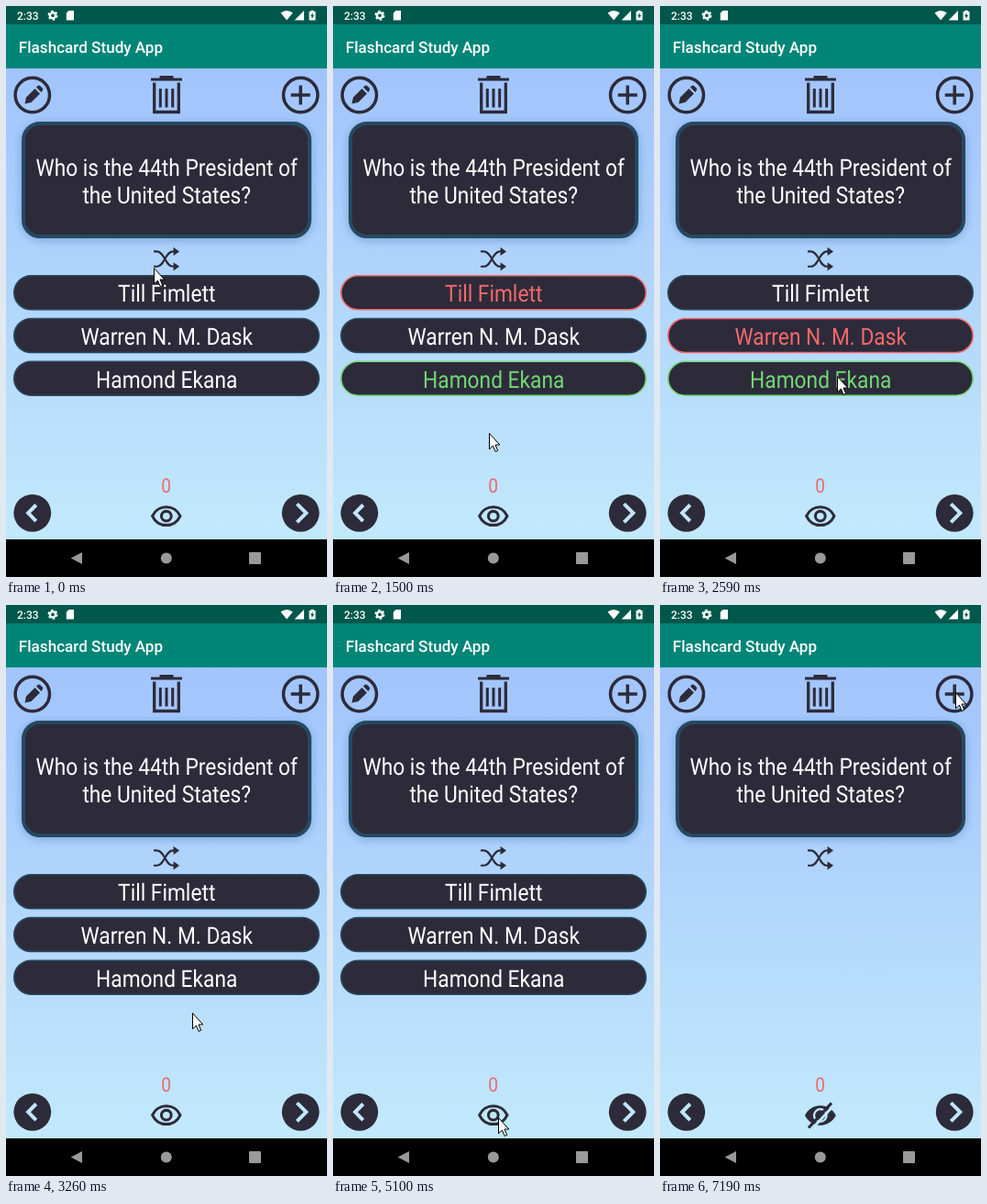
Animation of 350 by 622 pixels, one loop 8 s. Source, as an HTML page:

```html
<!DOCTYPE html>
<html lang="en">
<head>
<meta charset="utf-8">
<title>Flashcard Study App</title>
<style>
html, body { margin: 0; width: 100%; height: 100%; overflow: hidden; background: #000; }
svg { display: block; width: 350px; height: 622px; }
text { font-family: Roboto, sans-serif; fill: #fff; text-rendering: geometricPrecision; }
.bar { font-weight: 500; }
.big { font-size: 25.6px; text-anchor: middle; }
.ink { fill: #2d2b3a; }
.line { fill: none; stroke: #2d2b3a; }
.answer rect { fill: #2d2b3a; stroke: #29475f; stroke-width: 1.6; }
.wrong rect { stroke: #f4696b; }
.right rect { stroke: #72d873; }
.wrong text { fill: #f4696b; }
.right text { fill: #72d873; }
.hidden { display: none; }
</style>
</head>
<body>
<svg viewBox="0 0 350 622">
  <defs>
    <linearGradient id="sky" x2="0" y2="1">
      <stop stop-color="#a1c4fd"/><stop offset="1" stop-color="#c2e9fb"/>
    </linearGradient>
    <filter id="soft" x="-10%" y="-20%" width="120%" height="140%"><feGaussianBlur stdDeviation="4"/></filter>
  </defs>

  <rect y="68" width="350" height="513" fill="url(#sky)"/>
  <rect width="350" height="20" fill="#00574b"/>
  <rect y="20" width="350" height="48" fill="#008577"/>
  <rect y="581" width="350" height="41"/>

  <!-- status bar -->
  <text class="bar" x="12" y="14.7" font-size="12">2:33</text>
  <g fill="#fff">
    <circle cx="51" cy="10.3" r="3.1" fill="none" stroke="#fff" stroke-width="2.4"/>
    <circle cx="51" cy="10.3" r="4.7" fill="none" stroke="#fff" stroke-width="1.6" stroke-dasharray="2.5 2.42"/>
    <path d="M68.5 5H74V15.5H65.8V7.7Z"/>
    <path d="M299.5 7.6Q306 2.6 312.8 7.6L306.1 15.4Z"/>
    <path d="M325 5V15.4H314.6Z"/>
    <path d="M332.4 4.8H335.6V6H337.5V15.5H330.5V6H332.4Z"/>
  </g>
  <path d="M334.6 7.2L331.9 11.3H333.5V14L336.1 9.9H334.6Z" fill="#00574b"/>
  <text class="bar" x="13.8" y="51" font-size="17.1">Flashcard Study App</text>

  <!-- tools -->
  <g class="line" stroke-width="3.5">
    <circle cx="28.8" cy="97" r="18.7"/>
    <circle cx="321.2" cy="97" r="18.7"/>
    <path d="M321.2 86.5V107.5M310.7 97H331.7"/>
    <path d="M158 80H192M167.5 77.6H182.5" stroke-width="3"/>
    <path d="M161.7 83.5V115.5H188.3V83.5" stroke-width="3.3"/>
    <path d="M168.3 90V110.5M175 90V110.5M181.7 90V110.5" stroke-width="3"/>
  </g>
  <path class="ink" d="M22 99.5L31.5 90L37 95.5L27.5 105L20.5 106.5ZM33 88.5L34.8 86.8Q36 86 37.2 86.9L39.8 89.6Q40.8 90.8 39.8 92.1L38.4 93.9Z"/>

  <!-- card -->
  <rect x="15" y="126" width="320" height="131" rx="24" fill="#6797cf" opacity=".55" filter="url(#soft)"/>
  <rect class="ink" x="19" y="128" width="312" height="123" rx="18" stroke="#264860" stroke-width="4"/>
  <g id="question"></g>

  <!-- shuffle -->
  <path class="line" stroke-width="2.1" d="M161 267.4H164.5C173 267.4 173.5 283.8 182 283.8H184M161 283.8H164.5C173 283.8 173.5 267.4 182 267.4H184"/>
  <path class="ink" d="M182.6 262.8L189 267.4L182.6 272ZM182.6 279.2L189 283.8L182.6 288.4Z"/>

  <g id="answers"></g>

  <!-- bottom row -->
  <text transform="translate(174.6 530) scale(.888 1)" font-size="21.5" text-anchor="middle" style="fill:#ee686f">0</text>
  <g id="open" class="line" stroke-width="2" transform="translate(174.8 555.7) scale(1.53)">
    <path d="M-9.9 0C-6.2 -8.6 6.2 -8.6 9.9 0C6.2 8.6 -6.2 8.6 -9.9 0Z"/>
    <circle r="3.5"/>
  </g>
  <g id="shut">
    <path class="ink" d="M158 556C165 541.6 184.5 541.6 191.8 556C184.5 570.4 165 570.4 158 556Z"/>
    <circle cx="174.8" cy="556" r="6.8" fill="none" stroke="#c0e7fb" stroke-width="2.3"/>
    <path d="M190 544.5L165 571.5" stroke="#c0e7fb" stroke-width="3"/>
    <path class="line" d="M187 542.5L162 569.5" stroke-width="3.2"/>
  </g>
  <circle class="ink" cx="28.8" cy="552.3" r="20.4"/>
  <circle class="ink" cx="321.2" cy="552.3" r="20.4"/>
  <path d="M32.8 543.5L24.2 552.3L32.8 561.1M317.3 542.3L327.3 552.3L317.3 562.3" fill="none" stroke="#c0e6fb" stroke-width="4"/>

  <!-- navigation bar -->
  <g fill="#999">
    <path d="M83 595V608L70.7 601.5Z"/>
    <circle cx="174.8" cy="601.5" r="6"/>
    <rect x="265" y="595" width="13" height="13" rx=".8"/>
  </g>

  <path id="cursor" d="M.5 .6V17.8L4.4 14.1L7.1 20.4L9.7 19.3L7 13H11.8Z" fill="#fff" stroke="#000" stroke-linejoin="round"/>
</svg>
<script>
const LOOP = 8000;
const STEP = 120;       // the pointer moves in visible jumps
const FEEDBACK = 760;   // how long a picked answer stays coloured
const HIDE = 5630;
const RIGHT = 2;
const picks = [1070, 2470, 4090];  // when each answer is pressed, top to bottom

// where the pointer heads next, and when it sets off
const home = { x: 161, y: 285 };
const goals = [
  { at: 0, x: 189, y: 452 },
  { at: 400, x: 181, y: 320 },
  { at: picks[0], x: 170, y: 465 },
  { at: 1920, x: 182, y: 362 },
  { at: picks[1], x: 203, y: 444 },
  { at: 3260, x: 194, y: 412 },
  { at: picks[2], x: 194, y: 454 },
  { at: 4860, x: 180, y: 558 },
  { at: 6380, x: 322, y: 95 }
];

const $ = id => document.getElementById(id);
const smooth = u => u * u * (3 - 2 * u);

// Roboto narrowed to the proportions of its condensed cut
const label = (str, y) =>
  `<text class="big" transform="translate(175.2 ${y}) scale(.888 1)">${str}</text>`;

$('question').innerHTML =
  label('Who is the 44th President of', 185.2) + label('the United States?', 215.2);

$('answers').innerHTML = ['Till Fimlett', 'Warren N. M. Dask', 'Hamond Ekana']
  .map((name, i) => {
    const y = 293.8 + i * 46.7;
    return `<g class="answer"><rect x="8.8" y="${y}" width="332.4" height="37" rx="18.5"/>${label(name, y + 28.3)}</g>`;
  }).join('');

const answers = [...$('answers').children];

function pointer(t) {
  const i = goals.findLastIndex(g => g.at <= t);
  const to = goals[i], from = goals[i - 1] || home;
  const dx = to.x - from.x, dy = to.y - from.y;
  const jumps = Math.round(1.3 + Math.hypot(dx, dy) / 100);
  const u = smooth(Math.min(1, Math.floor((t - to.at) / STEP) / jumps));
  return `translate(${Math.round(from.x + dx * u)} ${Math.round(from.y + dy * u)})`;
}

function draw(t) {
  const picked = picks.findIndex(p => t >= p && t < p + FEEDBACK);
  const shut = t >= HIDE;
  answers.forEach((el, i) => {
    el.classList.toggle('right', picked >= 0 && i === RIGHT);
    el.classList.toggle('wrong', i === picked && i !== RIGHT);
  });
  $('answers').classList.toggle('hidden', shut);
  $('open').classList.toggle('hidden', shut);
  $('shut').classList.toggle('hidden', !shut);
  $('cursor').setAttribute('transform', pointer(t));
}

const start = performance.now();
function tick() {
  draw((performance.now() - start) % LOOP);
  requestAnimationFrame(tick);
}
tick();
</script>
</body>
</html>
```
